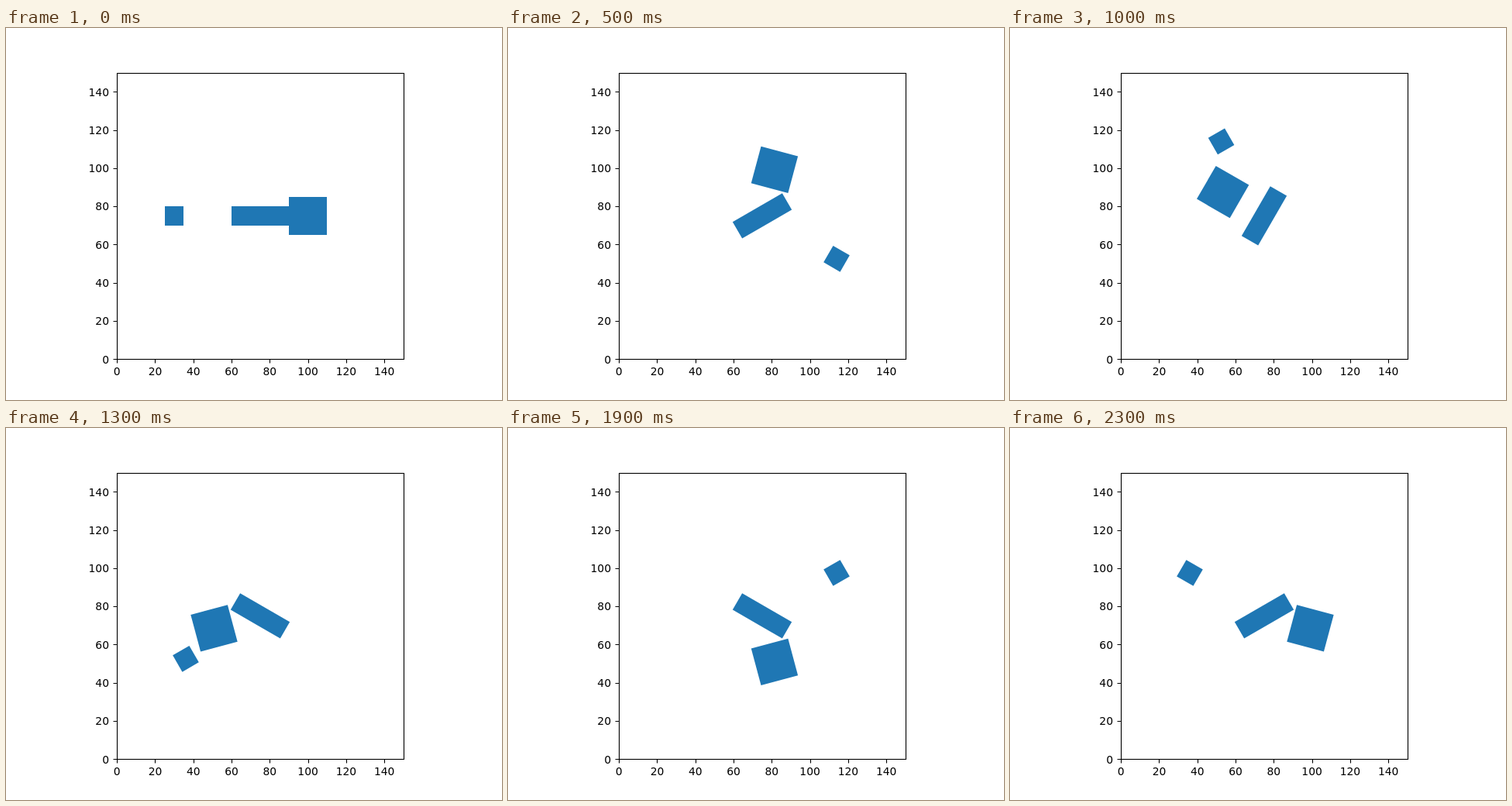
Recreate the animation shown at these times as an HTML page. Size 640 by 480 pixels, loop 2400 ms.

```html
<!DOCTYPE html>
<html lang="en">
<head>
<meta charset="utf-8">
<title>Rotating rectangles</title>
<style>
  html, body { margin: 0; width: 100%; height: 100%; overflow: hidden; background: #fff; }
  svg { display: block; }
  text { font: 13.89px "DejaVu Sans", sans-serif; }
  .axis { fill: none; stroke: #000; stroke-width: 1.11; }
</style>
</head>
<body>
<svg width="640" height="480" viewBox="0 0 640 480">
  <g id="shapes" fill="#1f77b4"></g>
  <rect class="axis" x="143.5" y="58.5" width="370" height="369"/>
  <g id="ticks"></g>
</svg>
<script>
const SCALE = 369.6 / 150, CENTER = 75, STEP = 100, STEPS = 24;
const toX = x => 143.2 + x * SCALE;
const toY = y => 427.2 - y * SCALE;

function add(parent, tag, attrs, text = '') {
  const el = document.createElementNS('http://www.w3.org/2000/svg', tag);
  for (const name in attrs) el.setAttribute(name, attrs[name]);
  el.textContent = text;
  return document.getElementById(parent).appendChild(el);
}

for (let v = 0; v <= 140; v += 20) {
  const x = toX(v), y = toY(v);
  add('ticks', 'path', { class: 'axis', d: `M${Math.round(x) + .5} 427.5v5M143.5 ${Math.round(y) + .5}h-5` });
  add('ticks', 'text', { x, y: 448, 'text-anchor': 'middle' }, v);
  add('ticks', 'text', { x: 133, y: Math.round(y + 5.35), 'text-anchor': 'end' }, v);
}

// Each rectangle turns about the middle of the plot by `turn` degrees per step.
const shapes = [
  { x: 60, y: 70, w: 30, h: 10, turn: -30 },
  { x: 90, y: 65, w: 20, h: 20, turn: 15 },
  { x: 25, y: 70, w: 10, h: 10, turn: 30 },
].map(s => ({ ...s, el: add('shapes', 'polygon', {}) }));

function corners({ x, y, w, h, turn }, step) {
  const angle = turn * step, a = angle * Math.PI / 180;
  const cos = Math.cos(a), sin = Math.sin(a);
  // Upright rectangles sit on whole pixels.
  const snap = angle % 90 ? v => v : Math.round;
  return [[x, y], [x + w, y], [x + w, y + h], [x, y + h]].map(([px, py]) => {
    const dx = px - CENTER, dy = py - CENTER;
    return [snap(toX(CENTER + dx * cos - dy * sin)), snap(toY(CENTER + dx * sin + dy * cos))];
  });
}

function draw(time) {
  const step = Math.floor(time / STEP) % STEPS;
  for (const s of shapes) s.el.setAttribute('points', corners(s, step).join(' '));
}

const start = performance.now();
function tick() {
  draw(performance.now() - start);
  requestAnimationFrame(tick);
}
tick();
</script>
</body>
</html>
```
